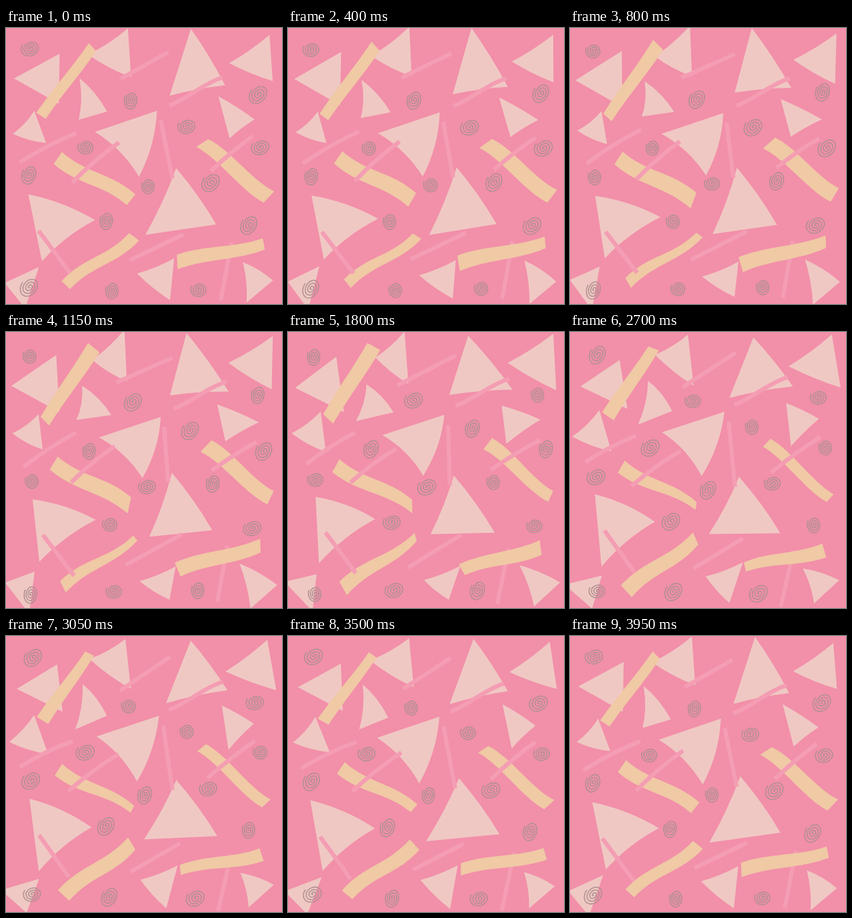
Animation, 360 px wide and 360 px high, one loop 4000 ms. Source, as an HTML page with a canvas:

```html
<!DOCTYPE html>
<html>
<head>
<meta charset="utf-8">
<style>
html, body { margin: 0; width: 100%; height: 100%; overflow: hidden; background: #f28fa9; }
canvas { display: block; }
</style>
</head>
<body>
<canvas id="stage" width="360" height="360"></canvas>
<script>
const ctx = document.getElementById('stage').getContext('2d');
const LOOP = 4000, STEP = 50, ORBIT = 3.6, RAD = Math.PI / 180;
let turn = 0;

// Every point circles its centre counterclockwise: centre x, centre y, phase in degrees.
function orbit([x, y, phase], r = ORBIT) {
  const a = turn + phase * RAD;
  return [x + r * Math.cos(a), y - r * Math.sin(a)];
}

// Three corners, then the bow: the first side swells, the second caves in.
const triangles = [
  [[10, 69, 90], [66, 33, 0], [71, 101, 135]],
  [[160, 66, 40], [110, 33, 200], [155, 0, 0], 2],
  [[238, 3, 40], [289, 74, 185], [211, 85, -55], 1.5],
  [[349, 72, 115], [288, 43, -40], [344, 5, 260], 1.5],
  [[134, 106, 225], [99, 66, 165], [91, 118, -20], 3],
  [[278, 92, 112], [326, 116, 235], [288, 145, 25], 1],
  [[51, 153, 75], [6, 135, -45], [39, 105, 225], 2],
  [[200, 107, 190], [174, 190, 255], [119, 134, 198], 5],
  [[32, 215, 205], [114, 247, -60], [43, 303, -15], 4],
  [[183, 266, 245], [219, 185, 45], [272, 259, 60], -2],
  [[211, 352, -45], [174, 321, 162], [222, 302, 150], 1.5],
  [[317, 357, 190], [305, 305, 0], [351, 327, 210], -2],
  [[40, 314, 45], [28, 364, 200], [-4, 329, -60]]
];

// Four corners, then the wave of the two long sides.
const ribbons = [
  [[105, 17, -40], [42, 108, 215], [55, 118, 180], [118, 26, 255], 3],
  [[70, 164, 45], [165, 218, 25], [160, 233, 140], [60, 180, 60], 10],
  [[264, 141, 260], [347, 210, -45], [337, 224, 250], [251, 153, 205], -9],
  [[162, 264, 240], [69, 328, -30], [80, 342, 30], [170, 275, -30], 11],
  [[223, 299, 100], [331, 273, -15], [334, 290, 25], [227, 315, 170], -6]
];

// Two ends, then the vertical pull of the handles.
const lowStreak = [[291, 281, 30], [276, 355, 0]];
const streaks = [
  [[146, 68, 35], [215, 30, 195]],
  [[215, 98, 230], [285, 62, 220], 4, -6],
  [[89, 134, -45], [20, 173, 215], -3],
  [[144, 151, 35], [83, 199, -40], -3],
  [[205, 120, 180], [214, 198, 40]],
  [[325, 140, 190], [265, 183, -60], -2],
  [[45, 262, 215], [85, 316, 235]],
  [[228, 267, -30], [159, 305, 50]]
];

// Centre, then the angle of the largest size; the first group stretches wide before tall.
const wideFirst = [
  [[327, 84, -45], 0], [[238, 126, 220], 90], [[334, 153, 225], 75],
  [[33, 191, 180], 290], [[183, 204, -40], 200], [[267, 198, 275], 0],
  [[133, 249, 225], 250], [[33, 339, 150], 0], [[138, 339, 275], 230]
];
const tallFirst = [
  [[33, 29, 120], 280], [[163, 91, 265], 115], [[106, 153, 225], 225],
  [[319, 254, 230], 30], [[249, 339, -40], 230]
];

function triangle([a, b, c, bow = 0]) {
  const p = [a, b, c].map(v => orbit(v));
  const mx = (p[0][0] + p[1][0] + p[2][0]) / 3;
  const my = (p[0][1] + p[1][1] + p[2][1]) / 3;
  ctx.beginPath();
  ctx.moveTo(...p[0]);
  [bow, -bow, 0].forEach((swell, i) => {
    const q = p[i], n = p[(i + 1) % 3];
    const x = (q[0] + n[0]) / 2, y = (q[1] + n[1]) / 2;
    const k = 2 * swell / Math.hypot(x - mx, y - my);
    ctx.quadraticCurveTo(x + (x - mx) * k, y + (y - my) * k, ...n);
  });
  ctx.fill();
}

function curve([x0, y0], [x1, y1], pull0, pull1) {
  const dx = (x1 - x0) / 3, dy = (y1 - y0) / 3;
  ctx.bezierCurveTo(x0 + dx, y0 + dy + pull0, x1 - dx, y1 - dy + pull1, x1, y1);
}

function ribbon([a, b, c, d, wave]) {
  const p = [a, b, c, d].map(v => orbit(v));
  ctx.beginPath();
  ctx.moveTo(...p[0]);
  curve(p[0], p[1], wave, -wave);
  ctx.lineTo(...p[2]);
  curve(p[2], p[3], -wave, wave);
  ctx.fill();
}

function streak([from, to, pull0 = 0, pull1 = pull0]) {
  const a = orbit(from), b = orbit(to);
  ctx.beginPath();
  ctx.moveTo(...a);
  curve(a, b, pull0, pull1);
  ctx.stroke();
}

function spiral([centre, peak], order) {
  const [x, y] = orbit(centre, 3);
  const a = turn - peak * RAD, lag = order * Math.PI / 4;
  const rx = 10.8 + 2 * Math.cos(a + lag), ry = 11.8 + 2 * Math.cos(a - lag);
  const skew = 0.12 + 0.15 * Math.cos(a), end = 7.2 * Math.PI;
  ctx.beginPath();
  for (let s = 0.6; s <= end; s += 0.15) {
    const r = s / end, v = r * ry * Math.sin(s);
    ctx.lineTo(x + r * rx * Math.cos(s) - skew * v, y + v);
  }
  ctx.stroke();
}

function draw(now) {
  turn = Math.floor(now % LOOP / STEP) * STEP / LOOP * 2 * Math.PI;
  ctx.fillStyle = '#f28fa9';
  ctx.fillRect(0, 0, 360, 360);
  ctx.save();
  ctx.translate(0.4, 0.4);
  ctx.fillStyle = '#f0c8c3';
  triangles.forEach(triangle);
  ctx.strokeStyle = '#f49db3';
  ctx.lineWidth = 5.5;
  streak(lowStreak);
  ctx.fillStyle = '#f0c9a5';
  ribbons.forEach(ribbon);
  streaks.forEach(streak);
  ctx.strokeStyle = '#ad9090';
  ctx.lineWidth = 1.3;
  wideFirst.forEach(s => spiral(s, 1));
  tallFirst.forEach(s => spiral(s, -1));
  ctx.restore();
}

const start = performance.now();
function loop() {
  draw(performance.now() - start);
  requestAnimationFrame(loop);
}
loop();
</script>
</body>
</html>
```
